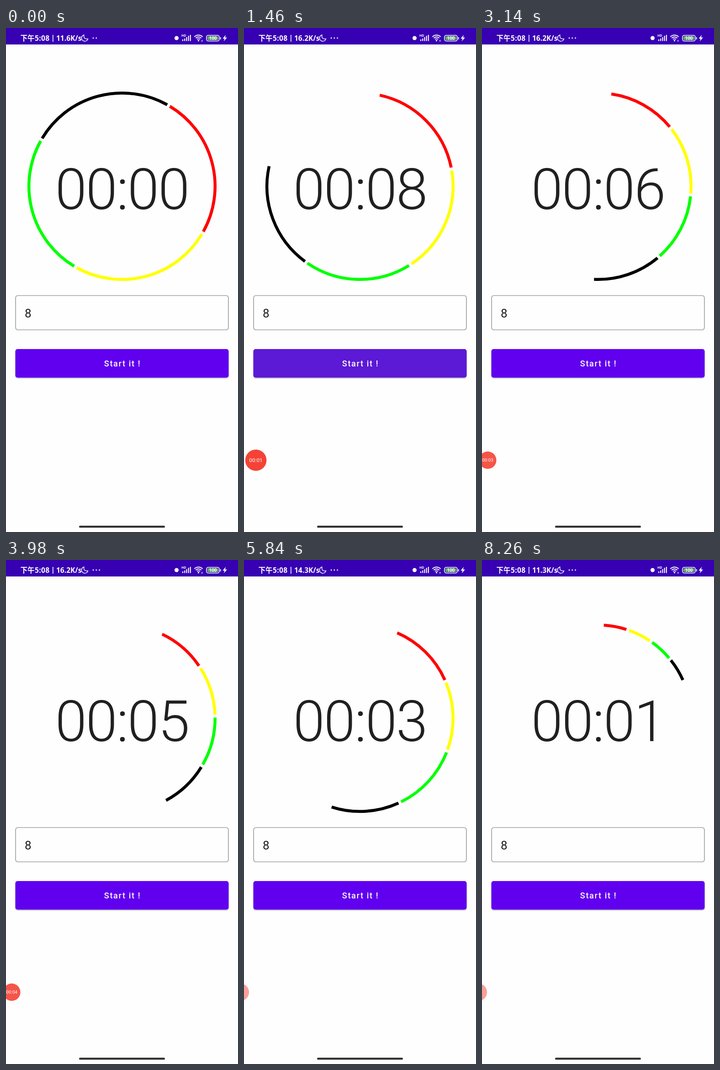
Write an HTML page with a canvas that moves like this. It is 508 px wide and 1102 px high and loops after 8320 ms.

```html
<!DOCTYPE html>
<html lang="en">
<head>
<meta charset="utf-8">
<title>Countdown</title>
<style>
html, body { margin: 0; width: 100%; height: 100%; overflow: hidden; background: #fefefe; }
canvas { display: block; }
</style>
</head>
<body>
<canvas id="stage" width="508" height="1102"></canvas>
<script>
const ctx = document.getElementById('stage').getContext('2d');
const LOOP = 8320, STEP = 60, CLICK = 1120, SWING = 900;
const COLORS = ['#ff0000', '#ffff00', '#00ff00', '#000000'];
const UI = 'Roboto, sans-serif';
const BAR = '"Noto Sans", "Noto Sans CJK SC", "Noto Sans CJK", sans-serif';

const clamp = v => Math.max(0, Math.min(1, v));
const ramp = (t, from, to) => clamp((t - from) / (to - from));
const mix = (a, b, k) => a + (b - a) * k;

function text(str, x, y, font, color, align = 'left', spacing = 0) {
  ctx.font = font;
  ctx.fillStyle = color;
  ctx.textAlign = align;
  ctx.letterSpacing = spacing + 'px';
  ctx.fillText(str, x, y);
}

function box(x, y, w, h, r) {
  ctx.beginPath();
  ctx.roundRect(x, y, w, h, r);
}

function disc(x, y, r, color) {
  ctx.beginPath();
  ctx.arc(x, y, r, 0, Math.PI * 2);
  ctx.fillStyle = color;
  ctx.fill();
}

function stroke(color, width) {
  ctx.strokeStyle = color;
  ctx.lineWidth = width;
  ctx.stroke();
}

function moon() {
  ctx.beginPath();
  ctx.arc(172.5, 22, 7, 0.25, Math.PI * 1.42);
  ctx.quadraticCurveTo(169, 25, 179.3, 23.7);
  ctx.closePath();
  stroke('#fff', 1.4);
}

function wifi() {
  for (const r of [4.5, 8.5, 12.5]) {
    ctx.beginPath();
    ctx.arc(421.5, 28, r, -Math.PI * 0.76, -Math.PI * 0.24);
    stroke('#fff', 1.9);
  }
  disc(421.5, 27.5, 1.7, '#fff');
  ctx.fillStyle = '#b9a4e4';
  ctx.fillRect(427.5, 26, 1.3, 4);
  ctx.fillRect(429.7, 26, 1.3, 4);
}

function battery() {
  box(439, 16, 28, 12.5, 4);
  ctx.fillStyle = '#3700b3';
  ctx.fill();
  stroke('#fff', 1.6);
  box(441, 18, 24, 8.5, 2.5);
  ctx.fillStyle = '#5fae68';
  ctx.fill();
  ctx.fillStyle = '#fff';
  ctx.fillRect(468.8, 20, 1.8, 5);
  text('100', 453, 26, '700 10px ' + BAR, '#fff', 'center');
}

function bolt() {
  ctx.beginPath();
  ctx.moveTo(481, 15);
  ctx.lineTo(474.5, 23.2);
  ctx.lineTo(478.5, 23.2);
  ctx.lineTo(477, 29);
  ctx.lineTo(484, 20.8);
  ctx.lineTo(479.8, 20.8);
  ctx.closePath();
  ctx.fillStyle = '#fff';
  ctx.fill();
}

function statusBar(t) {
  ctx.fillStyle = '#3700b3';
  ctx.fillRect(0, 0, 508, 36);
  const speed = t < 200 ? '11.6' : t < 4200 ? '16.2' : t < 8200 ? '14.3' : '11.3';
  const font = '600 15.5px ' + BAR;
  text('下午', 31.5, 28, font, '#fff');
  text('5:08', 63, 28, font, '#fff', 'left', 0.4);
  ctx.fillStyle = '#fff';
  ctx.fillRect(102, 15, 1.6, 15);
  text(speed + 'K/s', 110, 28, font, '#fff');
  moon();
  const dots = t < 200 ? 2 : 3;
  for (let i = 0; i < dots; i++) disc(191 + i * 6.8, 22, 1.4, '#fff');

  disc(373.5, 22, 4.5, '#fff');
  text('HD', 384, 18.5, '700 7px ' + BAR, '#fff');
  ctx.fillStyle = '#fff';
  [3.5, 5.5, 8.5, 11.5, 13.5].forEach((h, i) => ctx.fillRect(386 + i * 4.2, 28.5 - h, 2.1, h));
  wifi();
  battery();
  bolt();
}

// The ring swings 30° back and forth; its sweep fills and empties once per swing.
function ring(t) {
  let shift = 30, sweep = 360;
  if (t >= CLICK) {
    const phase = ((t - CLICK) / SWING) % 2;
    const u = phase < 1 ? phase : 2 - phase;
    shift = 30 * u;
    sweep = 360 * (1 - Math.abs(2 * u - 1));
  }
  const rad = deg => (deg - 90) * Math.PI / 180;
  const part = sweep / 4, gap = 0.9;
  COLORS.forEach((color, i) => {
    const from = shift + i * part + gap;
    const to = shift + (i + 1) * part - gap;
    ctx.beginPath();
    ctx.arc(254, 346, 203.8, rad(from), rad(to), to < from);
    stroke(color, 6.5);
  });
}

function counter(t) {
  const left = t < CLICK ? 0 : Math.round(8 - (t - CLICK) / 1000);
  text('00:0' + left, 254, 395.5, '300 124.4px ' + UI, '#202020', 'center', -1.94);
}

function form(t) {
  box(21, 585, 466, 75, 5);
  stroke('#a2a2a2', 1.7);
  text('8', 41, 633, '400 26px ' + UI, '#1c1c1c');

  const press = ramp(t, 1020, 1120) * (1 - ramp(t, 1460, 1640));
  ctx.save();
  ctx.shadowColor = 'rgba(0,0,0,.28)';
  ctx.shadowBlur = 3;
  ctx.shadowOffsetY = 1.5;
  box(20.5, 702, 467, 62.5, 5);
  ctx.fillStyle = `rgb(${mix(96, 92, press)},${mix(0, 25, press)},${mix(239, 214, press)})`;
  ctx.fill();
  ctx.restore();
  text('Start it !', 255, 740, '500 18.1px ' + UI, '#fff', 'center', 1.62);
}

// Recorder bubble: full, then small at the edge, then half hidden.
function bubble(t) {
  if (t < 320) return;
  const dock = ramp(t, 1880, 2120), hide = ramp(t, 4220, 4460);
  const x = mix(mix(26, 12.5, dock), -8, hide);
  ctx.save();
  ctx.globalAlpha = mix(mix(1, 0.9, dock), 0.5, hide);
  disc(x, 945, mix(23.3, 19, dock), '#f44336');
  if (hide < 1) {
    const sec = Math.floor((t + 250) / 1000);
    ctx.globalAlpha = 1 - hide;
    text('00:0' + sec, x, mix(949.2, 948.2, dock), `400 ${mix(11.8, 9.8, dock)}px ${UI}`, '#fff', 'center');
  }
  ctx.restore();
}

function draw(t) {
  ctx.fillStyle = '#fefefe';
  ctx.fillRect(0, 0, 508, 1102);
  statusBar(t);
  ring(t);
  counter(t);
  form(t);
  bubble(t);
  box(160, 1088.2, 188, 4.4, 2.2);
  ctx.fillStyle = '#2c2c2c';
  ctx.fill();
}

function tick() {
  const t = performance.now() % LOOP;
  // the screen refreshes in 60 ms steps
  draw(Math.max(0, Math.floor((t - 20) / STEP) * STEP + 20));
  requestAnimationFrame(tick);
}
tick();
</script>
</body>
</html>
```
